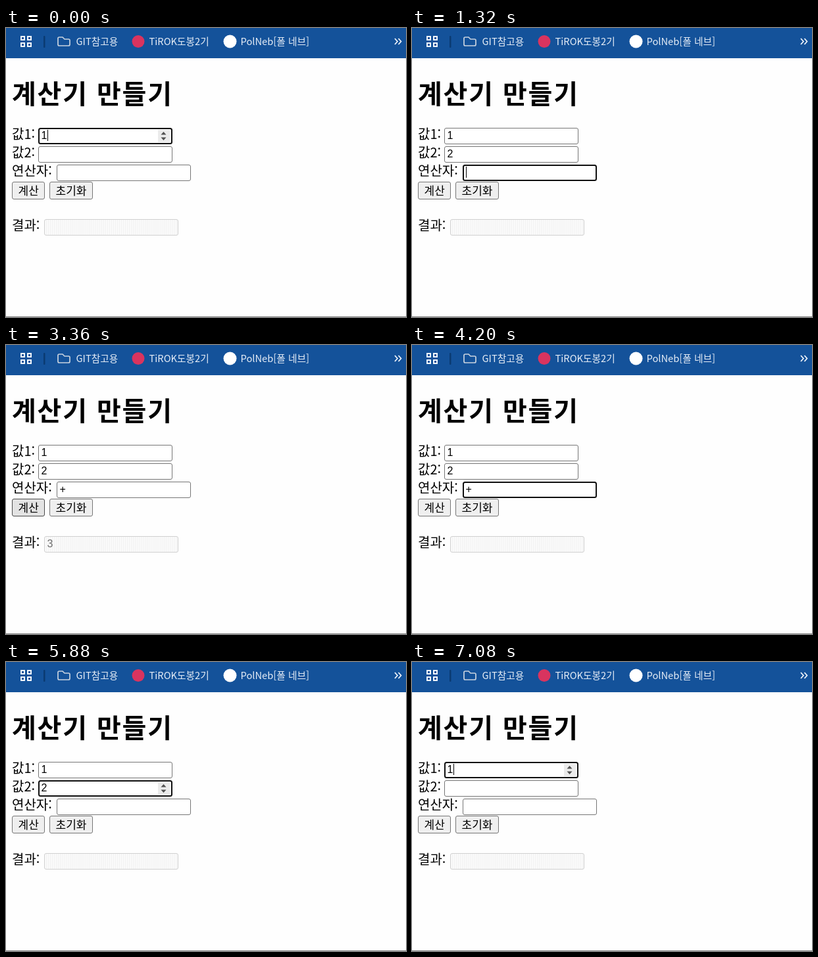
Write an HTML page that moves like this. It is 608 by 440 pixels and loops after 7200 ms.

```html
<!DOCTYPE html>
<html lang="ko">
<head>
<meta charset="utf-8">
<style>
  html, body { margin: 0; width: 100%; height: 100%; overflow: hidden; background: #fefefe; }
  svg { display: block; width: 608px; height: 440px; }
  text { font: 350 20px "Noto Sans CJK KR", "Noto Sans CJK", sans-serif; }
  .bar text { font-size: 14.7px; font-weight: 500; fill: #e6edf6; }
  .title { font-size: 40px; font-weight: 700; letter-spacing: 1.8px; }
  .button text { font-size: 17px; font-weight: 400; }
  .button rect { fill: #efefef; stroke: #767676; }
  .button.active rect { fill: #e3e3e3; stroke: #4a4a4a; }
  .field text { font: 16px "Liberation Sans", Arial, sans-serif; }
  .field .box { x: .5px; y: .5px; width: 203px; height: 24px; fill: #fff; stroke: #767676; }
  .field.focus .box { x: 1px; y: 1px; width: 202px; height: 23px; stroke: #101010; stroke-width: 2; }
  .field .spin { visibility: hidden; }
  .field.focus .spin { visibility: visible; }
  .field.off .box { fill: url(#stripes); stroke: #d0d0d0; }
  .field.off text { fill: #6d6d6d; }
</style>
</head>
<body>
<svg viewBox="0 0 608 440">
  <defs>
    <pattern id="stripes" width="3" height="4" patternUnits="userSpaceOnUse">
      <rect width="3" height="4" fill="#fafafa"/>
      <rect width="1" height="4" fill="#f2f2f2"/>
    </pattern>
  </defs>

  <g class="bar">
    <rect width="608" height="46" fill="#14529a"/>
    <g fill="none" stroke="#f2f6fb" stroke-width="2">
      <path d="M23 13h5v5h-5zM33 13h5v5h-5zM23 23h5v5h-5zM33 23h5v5h-5z"/>
      <path d="M79 16q0-2 2-2h5l3 3h6q2 0 2 2v6q0 2-2 2h-14q-2 0-2-2z" stroke="#c9d3df" stroke-width="1.7"/>
      <path d="M591 16l4 4.5-4 4.5M596.5 16l4 4.5-4 4.5" stroke-width="1.7"/>
    </g>
    <rect x="57" y="12" width="2.5" height="18" rx="1" fill="#0b3b72"/>
    <circle cx="201" cy="20.5" r="9.5" fill="#d9345f"/>
    <circle cx="340.5" cy="20.5" r="10" fill="#fff"/>
    <text x="106.5" y="26">GIT참고용</text>
    <text x="217.5" y="26">TiROK도봉2기</text>
    <text x="356.5" y="26">PolNeb[폴 네브]</text>
  </g>

  <text class="title" x="9" y="115">계산기</text>
  <text class="title" x="138" y="115">만들기</text>
  <text x="9" y="168.5">값1:</text>
  <text x="9" y="197">값2:</text>
  <text x="9" y="225">연산자:</text>
  <text x="9" y="307.5">결과:</text>

  <g id="fields"></g>

  <g class="button" id="calc">
    <rect x="9.5" y="234.5" width="49" height="26" rx="2.5"/>
    <text x="18.5" y="254">계산</text>
  </g>
  <g class="button">
    <rect x="66.5" y="234.5" width="65" height="26" rx="2.5"/>
    <text x="75.5" y="254">초기화</text>
  </g>
  <rect y="439" width="608" height="1" fill="#8a8a8a"/>
</svg>
<script>
const LOOP = 7200, BLINK = 360;
const FOCUS_2 = 360, TYPE_2 = 720, FOCUS_OP = 1320, TYPE_OP = 2280, CLICK = 3240;
const caretResets = [0, FOCUS_2, TYPE_2, FOCUS_OP, TYPE_OP];

const spinner = `<g class="spin">
  <rect x="182" y="3" width="18" height="19" fill="#ebebeb"/>
  <path d="M186.5 10.5l4-4.5 4 4.5zM186.5 14.5l4 4.5 4-4.5z" fill="#505050"/></g>`;

const field = (x, y, kind = "", extra = "") => `<g class="field ${kind}" transform="translate(${x} ${y})">
  <rect class="box" rx="2.5"/>${extra}
  <text x="4.5" y="17"></text>
  <rect class="caret" y="3" width="1" height="17"/></g>`;

const holder = document.getElementById("fields");
const calc = document.getElementById("calc");
holder.innerHTML = field(49, 152, "", spinner) + field(49, 180, "", spinner) +
  field(77, 208) + field(58, 291, "off");
const fields = [...holder.children].map(el => ({
  el, text: el.querySelector("text"), caret: el.querySelector(".caret")
}));

function draw(now) {
  const t = now % LOOP;
  const u = Math.min(t, LOOP - .01 - t); // the second half plays backwards
  const focus = u < FOCUS_2 ? 0 : u < FOCUS_OP ? 1 : u < CLICK ? 2 : -1;
  const reset = Math.max(...caretResets.filter(r => r <= u), 0);
  const caretOn = Math.floor((u - reset) / BLINK) % 2 === 0;
  const values = ["1", u < TYPE_2 ? "" : "2", u < TYPE_OP ? "" : "+", u < CLICK ? "" : "3"];

  fields.forEach(({ el, text, caret }, i) => {
    el.classList.toggle("focus", i === focus);
    text.textContent = values[i];
    caret.setAttribute("x", values[i] ? 14 : 5);
    caret.style.visibility = i === focus && caretOn ? "visible" : "hidden";
  });
  calc.classList.toggle("active", focus < 0);
}

const start = performance.now();
function tick() {
  draw(performance.now() - start);
  requestAnimationFrame(tick);
}
tick();
</script>
</body>
</html>
```
